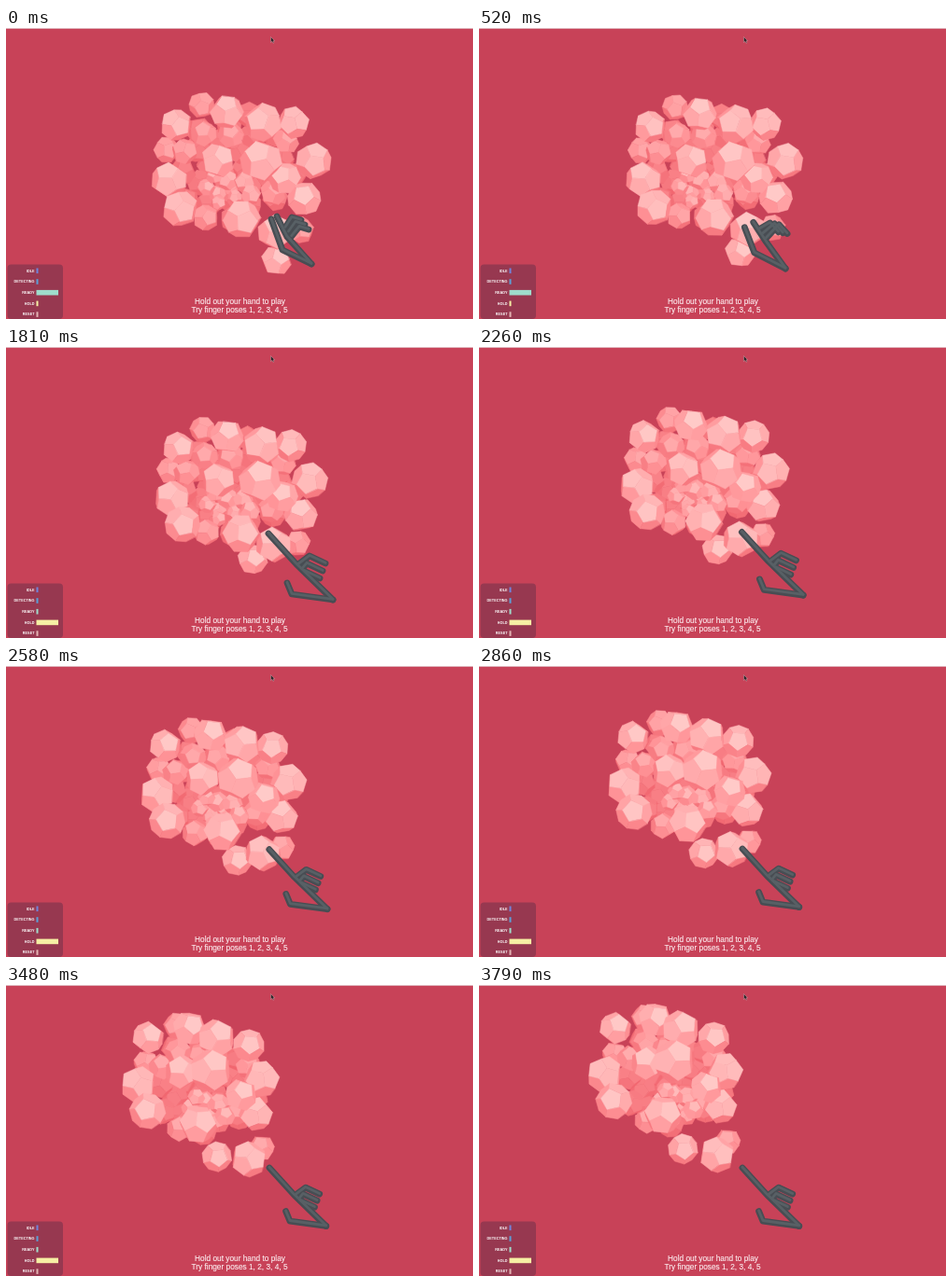
An HTML page with a canvas for the animation above (3.81 s loop, 500x312 px).

```html
<!DOCTYPE html>
<html lang="en">
<head>
<meta charset="utf-8">
<style>
  html, body { margin: 0; width: 500px; height: 312px; overflow: hidden; background: #c84258; }
  canvas, svg { position: absolute; left: 0; top: 0; display: block; }
  text { font-family: "Liberation Sans", Arial, sans-serif; }
  .hint { font-size: 8.3px; fill: #fdeef0; stroke: #fdeef0; stroke-width: .12; text-anchor: middle; }
  .label { font-size: 3.8px; font-weight: bold; fill: #fff; text-anchor: end; }
</style>
</head>
<body>
<canvas id="stage" width="500" height="312"></canvas>
<svg width="500" height="312" viewBox="0 0 500 312">
  <path d="M283.5 9.5v6l1.4-1.2 1 2 1-.5-.9-2h1.7z" fill="#2c2529" stroke="#e5b9c0" stroke-width=".4"/>
  <rect x="1.5" y="253.5" width="59.5" height="58.5" rx="4" fill="#973850"/>
  <g id="panel"></g>
  <text class="hint" x="250.5" y="295.6">Hold out your hand to play</text>
  <text class="hint" x="250" y="305">Try finger poses 1, 2, 3, 4, 5</text>
</svg>
<script>
const LOOP = 3810;
const ctx = document.getElementById('stage').getContext('2d');
const mix = (a, b, k) => a + (b - a) * k;
const clamp = v => Math.max(0, Math.min(1, v));
const ease = (t, a, b) => { const k = clamp((t - a) / (b - a)); return k * k * (3 - 2 * k); };

// Status panel
const panel = document.getElementById('panel');
const states = { IDLE: '#7183dc', DETECTING: '#5b9fd8', READY: '#9fdccb', HOLD: '#f6efa4', RESET: '#e3b3b3' };
const bars = Object.entries(states).map(([name, fill], i) => {
  const y = 260.3 + i * 11.7;
  const add = (tag, attrs) => {
    const el = document.createElementNS('http://www.w3.org/2000/svg', tag);
    for (const k in attrs) el.setAttribute(k, attrs[k]);
    return panel.appendChild(el);
  };
  add('text', { class: 'label', x: 30.5, y: y + 1.3 }).textContent = name;
  return add('rect', { x: 32.5, y: y - 2.8, width: 2, height: 5.6, fill });
});

// Dodecahedron: faces point at the corners of an icosahedron
const PHI = (1 + Math.sqrt(5)) / 2;
const dot = (a, b) => a[0] * b[0] + a[1] * b[1] + a[2] * b[2];
const cross = (a, b) => [a[1] * b[2] - a[2] * b[1], a[2] * b[0] - a[0] * b[2], a[0] * b[1] - a[1] * b[0]];
const unit = v => v.map(c => c / Math.hypot(...v));
const signs = [-1, 1], corners = [], normals = [];
for (const a of signs) for (const b of signs) {
  for (const c of signs) corners.push(unit([a, b, c]));
  for (let s = 0; s < 3; s++) {
    const turn = v => [v[s], v[(s + 1) % 3], v[(s + 2) % 3]];
    corners.push(unit(turn([0, a / PHI, b * PHI])));
    normals.push(unit(turn([0, a * PHI, b])));
  }
}
const faces = normals.map(n => {
  const ring = corners.filter(c => dot(c, n) > .7);
  const u = unit(cross(n, ring[0])), w = cross(n, u);
  const angle = p => Math.atan2(dot(p, w), dot(p, u));
  return { n, ring: ring.sort((p, q) => angle(p) - angle(q)) };
});
const LIGHT = unit([.1, -.35, .9]);

function dodecahedron(x, y, r, ax, ay, az, shade) {
  const [sa, ca, sb, cb, sc, cc] = [ax, ay, az].flatMap(v => [Math.sin(v), Math.cos(v)]);
  const spin = ([px, py, pz]) => {
    [py, pz] = [py * ca - pz * sa, py * sa + pz * ca];
    [px, pz] = [px * cb + pz * sb, pz * cb - px * sb];
    return [px * cc - py * sc, px * sc + py * cc, pz];
  };
  for (const { n, ring } of faces) {
    const m = spin(n);
    if (m[2] <= 0) continue;
    const k = (.25 + .75 * clamp(dot(m, LIGHT))) * shade;
    ctx.fillStyle = ctx.strokeStyle = `rgb(${mix(238, 255, clamp(k * 2))},${mix(94, 202, k)},${mix(104, 200, k)})`;
    ctx.beginPath();
    for (const c of ring) { const p = spin(c); ctx.lineTo(x + p[0] * r, y + p[1] * r); }
    ctx.closePath();
    ctx.fill();
    ctx.stroke();
  }
}

// Balls, from back to front: sunflower fill, mid layer, small core, large shell
const sunflower = (n, x, y, rx, ry, size) => Array.from({ length: n }, (_, i) => {
  const d = Math.sqrt((i + .5) / n), a = i * 2.4;
  return { x: x + rx * d * Math.cos(a), y: y + ry * d * Math.sin(a), r: size(i) };
});
const layer = (balls, shade) => balls.map(b => ({ ...b, shade }));
const mid = [[204, 78], [169, 121], [187, 123], [206, 106], [233, 108], [288, 115], [275, 165], [208, 188], [303, 202]];
const large = [
  [177, 96, 16], [294, 96, 16], [227, 84, 17], [262, 94, 19], [313, 133, 18], [304, 170, 17], [285, 150, 16],
  [218, 131, 17], [169, 149, 18], [180, 177, 18], [241, 188, 19], [259, 131, 21]
].map(([x, y, r]) => ({ x, y, r }));
// Two stray balls near the hand: one is knocked in, one lags behind
const strays = [{ x: 255, y: 217, r: 15, kick: 24 }, { x: 280, y: 206, r: 18, share: .55 }];
const balls = [
  ...layer(sunflower(24, 238, 141, 62, 54, () => 13), .35),
  ...layer(mid.map(([x, y]) => ({ x, y, r: 13 })), .72),
  ...layer(sunflower(9, 230, 162, 27, 17, i => 7 + i % 3 * 1.5), .85),
  ...layer([...strays, ...large], 1)
];

function drawBalls(t) {
  const drift = Math.max(-.25, (t - 2260) / 1530);
  const open = 1 - ease(t, 70, 1110), turn = t / 9000;
  ctx.lineWidth = .5;
  balls.forEach(({ x, y, r, shade, kick = 0, share = 1 }, i) => {
    // Bigger balls are nearer and travel further
    const near = r - 17, go = drift * share;
    const dx = -39 - .1 * (x - 235) - 2.2 * near;
    const dy = -46 + .09 * (x - 235) - 1.5 * near;
    dodecahedron(
      x + dx * go + (.05 * (x - 230) + kick) * open,
      y + dy * go + (.1 * (y - 140) + kick * .6) * open,
      r * 1.09, .45 + Math.sin(i * 2.4) * .3 + turn, Math.sin(i * 1.7) * .35 - turn, i * 1.3, shade);
  });
}

// Hand poses: a few joints each; three curled fingers repeat by a gap
const fist = {
  wrist: [327, 253], thumb: [296, 238], thumbTip: [284, 205], knuckle: [301, 224], tip: [290, 202],
  base: [299, 214], bend: [306, 203], curl: [316, 206], gap: [4, 5]
};
const relaxed = {
  wrist: [330, 266], thumb: [293, 246], thumbTip: [285, 228], knuckle: [318, 238], tip: [300, 219],
  base: [304, 217], bend: [321, 219], curl: [328, 240], gap: [6, -6]
};
const point = {
  wrist: [350, 271], thumb: [306, 265], thumbTip: [301, 253], knuckle: [311, 233], tip: [281, 200],
  base: [313, 233], bend: [325, 224], curl: [342, 232], gap: [-3, 8]
};
const lerp = (a, b, k) => a.map((v, i) => mix(v, b[i], k));
const blend = (a, b, k) => Object.fromEntries(Object.keys(a).map(j => [j, lerp(a[j], b[j], k)]));

function drawHand(t) {
  const h = blend(blend(fist, relaxed, ease(t, 100, 1110)), point, ease(t, 1250, 1700));
  const fingers = [0, 1, 2].map(i => {
    const step = p => p.map((v, j) => v + h.gap[j] * i);
    return [lerp(h.base, h.wrist, i * .12), step(h.bend), step(h.curl)];
  });
  const strokes = [[h.wrist, h.thumb, h.thumbTip], [h.wrist, h.knuckle, h.tip], ...fingers];
  // The hand backs away, shrinking towards the fingertip
  const away = ease(t, 1810, 2860), scale = 1 - .12 * away;
  const place = ([x, y]) => [mix(h.tip[0], x, scale) + away, mix(h.tip[1], y, scale) - 4 * away];
  ctx.lineCap = ctx.lineJoin = 'round';
  for (const [color, width, lift] of [['#484d53', 6.8, 0], ['#586065', 2.8, -.7]]) {
    ctx.strokeStyle = color;
    ctx.lineWidth = width;
    for (const stroke of strokes) {
      ctx.beginPath();
      for (const p of stroke) { const [x, y] = place(p); ctx.lineTo(x, y + lift); }
      ctx.stroke();
    }
  }
}

const start = performance.now();
function frame() {
  const t = (performance.now() - start) % LOOP;
  ctx.fillStyle = '#c84258';
  ctx.fillRect(0, 0, 500, 312);
  ctx.fillStyle = '#dfb4bb';
  ctx.fillRect(0, 0, 500, 1);
  drawBalls(t);
  drawHand(t);
  const active = t < 1450 ? 2 : 3;
  bars.forEach((bar, i) => bar.setAttribute('width', i === active ? 23.5 : 2));
  requestAnimationFrame(frame);
}
frame();
</script>
</body>
</html>
```
